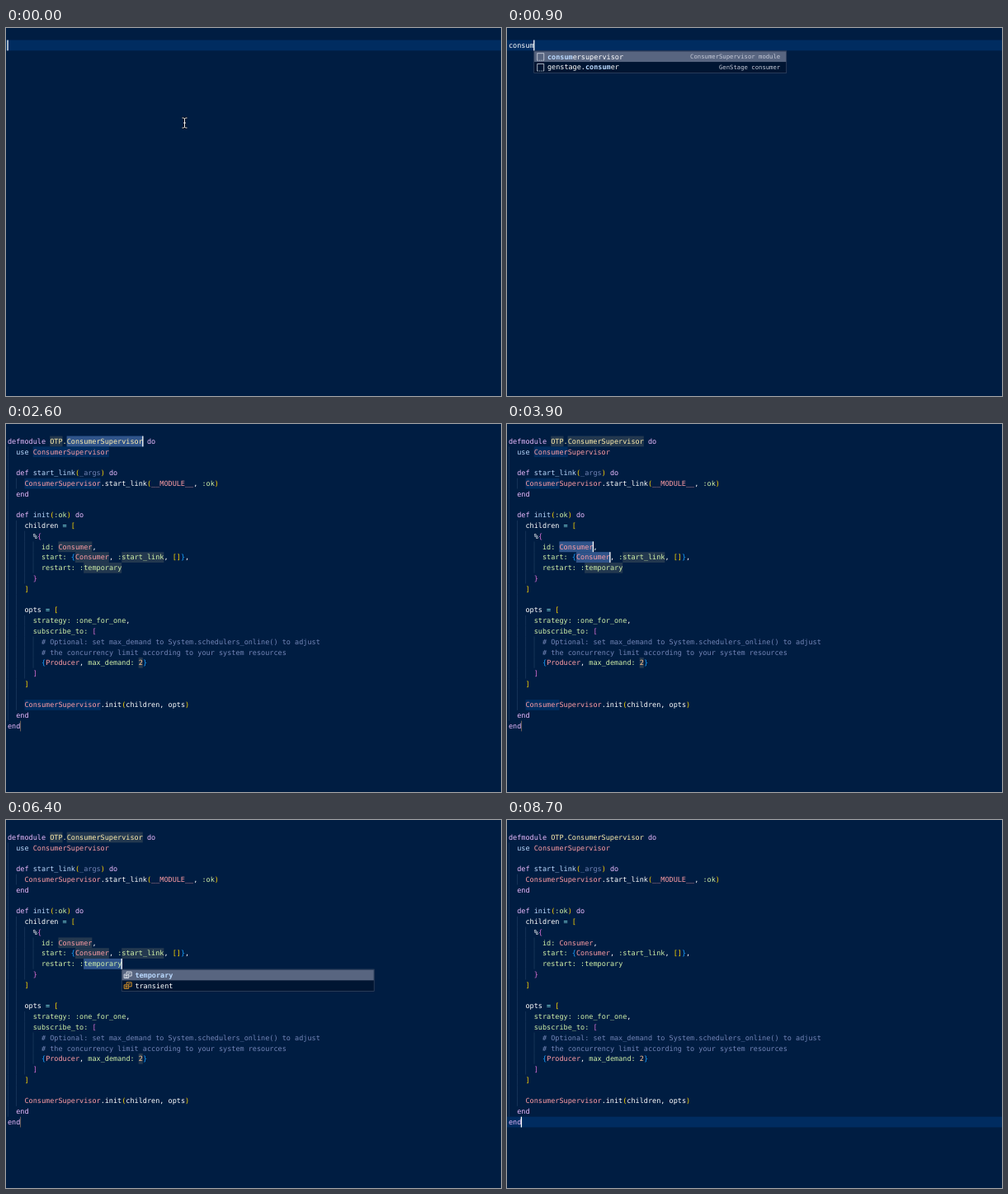
These frames come from a looping animation (600 by 446 pixels, 8800 ms). An HTML page:

```html
<!DOCTYPE html>
<html lang="en">
<head>
<meta charset="utf-8">
<title>Snippet expansion</title>
<style>
  html, body { margin: 0; width: 100%; height: 100%; overflow: hidden; background: #001d42; }
  svg { display: block; }
  text {
    font: 8.5px "DejaVu Sans Mono", monospace;
    white-space: pre;
    fill: #fff;
    text-rendering: geometricPrecision;
  }
  .detail { font-size: 7.25px; fill: #c3c8d6; text-anchor: end; }
  .match { font-weight: bold; fill: #bbdaff; }
</style>
</head>
<body>
<svg id="stage" width="600" height="446" viewBox="0 0 600 446"></svg>
<script>
const LOOP = 8800, EXPAND = 1700, BLINK = 500;
const CHAR = 5.118, LINE = 12.78, LEFT = 2, TOP = 14.6;
const POPUP_WIDTH = 306;

const code = `defmodule OTP.ConsumerSupervisor do
  use ConsumerSupervisor

  def start_link(_args) do
    ConsumerSupervisor.start_link(__MODULE__, :ok)
  end

  def init(:ok) do
    children = [
      %{
        id: Consumer,
        start: {Consumer, :start_link, []},
        restart: :temporary
      }
    ]

    opts = [
      strategy: :one_for_one,
      subscribe_to: [
        # Optional: set max_demand to System.schedulers_online() to adjust
        # the concurrency limit according to your system resources
        {Producer, max_demand: 2}
      ]
    ]

    ConsumerSupervisor.init(children, opts)
  end
end`.split('\n');

// [time, characters typed]
const typing = [[0, 0], [200, 1], [300, 2], [400, 3], [600, 4], [700, 5], [900, 6]];

// Tab stops: time, then [line, column, length] ranges
const stops = [
  { at: 1700, ranges: [[0, 10, 3]] },
  { at: 2600, ranges: [[0, 14, 18]] },
  { at: 3500, ranges: [[10, 12, 8], [11, 16, 8]] },
  { at: 4400, ranges: [[11, 27, 10]] },
  { at: 5200, ranges: [[12, 18, 9]], choices: [['temporary', ''], ['transient', '']] },
  { at: 6600, ranges: [[21, 31, 1]] },
  { at: 7400, ranges: [[27, 3, 0]] }
];
const finalStop = stops[stops.length - 1];

const snippets = [
  ['consumersupervisor', 'ConsumerSupervisor module'],
  ['genstage.consumer', 'GenStage consumer'],
  ['cond', 'cond block'],
  ['config', 'config entry'],
  ['code', 'code block'],
  ['case', 'case block'],
  ['catch', 'catch clause'],
  ['callback', 'callback spec'],
  ['cast', 'handle cast'],
  ['call', 'handle call'],
  ['defstruct', 'struct'],
  ['doc', 'function doc']
];

const rules = [
  [/^#.*/, '#7285b7'],
  [/^OTP\.\w+/, '#ffeead'],
  [/^__\w+__/, '#ff9da4'],
  [/^_args/, '#7285b7'],
  [/^(defmodule|def|do|end)\b/, '#ebbbff'],
  [/^use\b/, '#bbdaff'],
  [/^\.\w+/, '#ffffff'],
  [/^(start_link|init)(?=\()/, '#bbdaff'],
  [/^\w+:/, '#d1f1a9'],
  [/^:\w+/, '#d1f1a9'],
  [/^[A-Z]\w*/, '#ff9da4'],
  [/^\d/, '#ffc58f'],
  [/^=/, '#99ffff'],
  [/^\w+/, '#ffffff'],
  [/^[^]/, '#ffffff']
];
const bracketColors = ['#ffd700', '#da70d6', '#179fff'];

const colX = col => LEFT + col * CHAR;
const lineY = line => TOP + line * LINE;
const rect = (x, y, w, h, fill, extra = '') =>
  `<rect x="${x}" y="${y}" width="${w}" height="${h}" fill="${fill}" ${extra}/>`;
const text = (x, y, body, cls = '') => `<text x="${x}" y="${y}" class="${cls}">${body}</text>`;
const mark = ([line, col, length], fill) =>
  rect(colX(col), lineY(line), length * CHAR, LINE, fill);
const caret = ([line, col, length]) =>
  rect(colX(col + length) - .6, lineY(line), 1.3, LINE, '#fff');
const rowHighlight = line => rect(0, lineY(line), 600, LINE, '#002c60');

function drawCode() {
  let depth = 0;
  return code.map((source, line) => {
    let rest = source, spans = '';
    while (rest) {
      let token = rest[0], color;
      if ('[({'.includes(token)) color = bracketColors[depth++ % 3];
      else if ('])}'.includes(token)) color = bracketColors[--depth % 3];
      else {
        const rule = rules.find(([pattern]) => pattern.test(rest));
        token = rest.match(rule[0])[0];
        color = rule[1];
      }
      spans += `<tspan fill="${color}">${token}</tspan>`;
      rest = rest.slice(token.length);
    }
    return text(LEFT, lineY(line) + 9.3, spans);
  }).join('');
}

function drawGuides() {
  const indent = line => line.search(/\S/);
  let out = '';
  code.forEach((source, i) => {
    const width = source ? indent(source)
      : Math.max(indent(code[i - 1]), indent(code[i + 1]));
    for (let col = 0; col < width; col += 2)
      out += rect(colX(col), lineY(i), .6, LINE, '#234064');
  });
  return out;
}

function occurrences([line, col, length]) {
  const word = code[line].substr(col, length), found = [];
  if (!word) return found;
  code.forEach((source, i) => {
    for (let at = source.indexOf(word); at >= 0; at = source.indexOf(word, at + 1))
      found.push([i, at, length]);
  });
  return found;
}

function snippetIcon(x, y) {
  return `<g fill="none" stroke="#d5d9e3" stroke-width=".8">
    <path d="M${x + 4} ${y + 11}V${y + 2.4}h8V${y + 11}"/>
    <path d="M${x + 4} ${y + 11}h8" stroke-dasharray="1.2 1"/></g>`;
}

function choiceIcon(x, y, color) {
  return `<g fill="none" stroke="${color}" stroke-width=".9">
    <path d="M${x + 6} ${y + 5}v-2.5h6v5h-3M${x + 8} ${y + 4.5}h2.5"/>
    <path d="M${x + 3} ${y + 5.5}h5.5v4.5h-5.5zM${x + 4.3} ${y + 7}h3M${x + 4.3} ${y + 8.6}h3"/></g>`;
}

function drawPopup(x, y, items, typed, isChoice) {
  const height = items.length * LINE + 1;
  let out = rect(x, y, POPUP_WIDTH, height, '#001532', 'stroke="#3b4964" stroke-width=".7"');
  items.forEach(([name, detail], i) => {
    const rowY = y + .5 + i * LINE, selected = i === 0;
    if (selected) out += rect(x + .4, rowY, POPUP_WIDTH - .8, LINE, '#586580');
    out += isChoice
      ? choiceIcon(x, rowY, selected ? '#e4e8ef' : '#ee9d28')
      : snippetIcon(x, rowY);
    const label = name.replace(typed, `<tspan class="match">${typed}</tspan>`);
    out += text(x + 16.2, rowY + 9.3, label);
    out += text(x + POPUP_WIDTH - 7.5, rowY + 9, detail, 'detail');
  });
  return out;
}

function drawPointer() {
  const path = 'M213.5 109h2l1 1 1-1h2M216.5 110v10M213.5 121h2l1-1 1 1h2M215 115h3';
  return `<path d="${path}" fill="none" stroke="#00060f" stroke-width="2.6"/>
    <path d="${path}" fill="none" stroke="#e8ebf0" stroke-width="1"/>`;
}

const isLit = elapsed => Math.floor(elapsed / BLINK) % 2 === 0;
const current = (steps, time, timeOf) => steps.filter(step => timeOf(step) <= time).pop();

function drawTyping(time) {
  const [since, count] = current(typing, time, step => step[0]);
  const typed = 'consum'.slice(0, count);
  let out = rowHighlight(0) + text(LEFT, lineY(0) + 9.3, typed);
  if (!count) out += drawPointer();
  if (time >= 300) {
    const items = snippets.filter(([name]) => name.includes(typed));
    out += drawPopup(colX(count), lineY(1) + .4, items, typed, false);
  }
  if (isLit(time - since)) out += caret([0, count, 0]);
  return out;
}

const codeLayer = drawCode(), guideLayer = drawGuides();

function drawSnippet(time) {
  const stop = current(stops, time, step => step.at);
  const { at, ranges, choices } = stop;
  let out = '';
  if (stop === finalStop) out += rowHighlight(27) + guideLayer;
  else {
    out += guideLayer;
    out += occurrences(ranges[0]).map(range => mark(range, '#002d5f')).join('');
    stops.slice(0, -1).forEach(other => other.ranges.forEach(range => {
      out += mark(range, other === stop ? '#30548a' : '#23384f');
    }));
    out += rect(colX(3) - .3, lineY(27), 1, LINE, '#6b5f5c');
  }
  out += codeLayer;
  if (choices) {
    const [line, col, length] = ranges[0];
    out += drawPopup(colX(col + length), lineY(line + 1) + .3, choices, 'temporary', true);
  }
  if (isLit(time - at)) out += ranges.map(caret).join('');
  return out;
}

const stage = document.getElementById('stage');
const start = performance.now();
let shown = -1;

function frame() {
  const time = Math.floor((performance.now() - start) % LOOP / 100) * 100;
  if (time !== shown) {
    stage.innerHTML = time < EXPAND ? drawTyping(time) : drawSnippet(time);
    shown = time;
  }
  requestAnimationFrame(frame);
}
frame();
</script>
</body>
</html>
```
